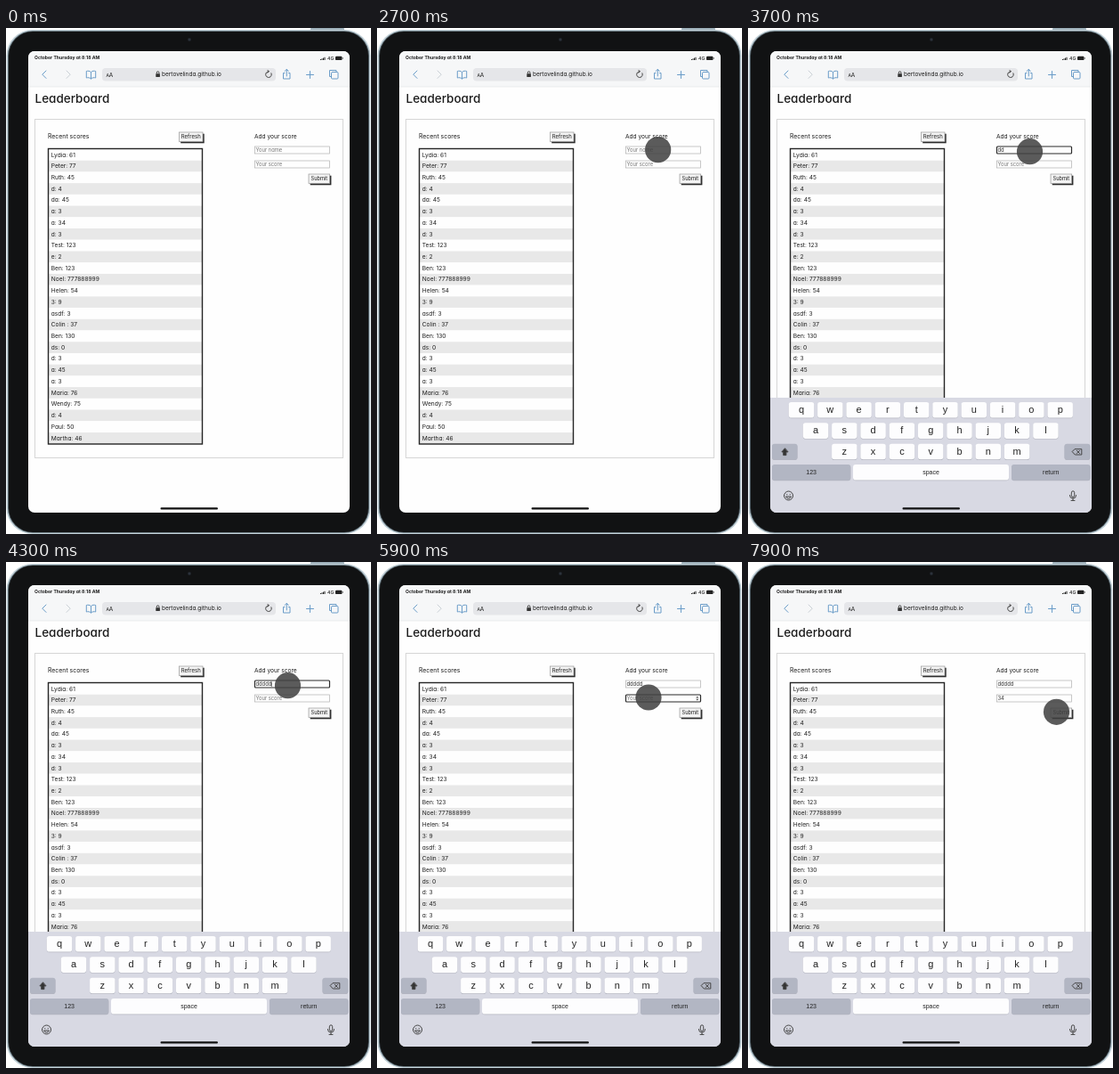
An HTML page that plays this animation: 410 by 568 pixels, repeating every 8000 ms.

```html
<!DOCTYPE html>
<html lang="en">
<head>
<meta charset="utf-8">
<title>Leaderboard on a tablet</title>
<style>
  html, body { margin: 0; width: 100%; height: 100%; overflow: hidden; background: #fff; }
  svg { display: block; }
  text { font-family: Inter, "Open Sans", sans-serif; font-feature-settings: "cv11"; fill: #1c1c1c; }
  .key { font-family: "Liberation Sans", Arial, sans-serif; text-anchor: middle; fill: #222; }
  .line { fill: none; stroke-width: 1; stroke-linecap: round; stroke-linejoin: round; }
  .blue { stroke: #6a9cc8; }
  .dark { stroke: #444; }
</style>
</head>
<body>
<svg id="stage" width="410" height="568" viewBox="0 0 410 568">
  <defs>
    <clipPath id="screen"><rect x="25" y="26" width="361" height="518" rx="7"/></clipPath>
  </defs>

  <!-- tablet body -->
  <rect x="342" y="0" width="38" height="5" rx="1" fill="#9fb1bb"/>
  <rect x="0.5" y="2" width="409" height="566" rx="29" fill="#c3d2d9"/>
  <rect x="2" y="3.2" width="406" height="563.6" rx="28" fill="#56646c"/>
  <rect x="3" y="4" width="404" height="562" rx="27" fill="#111213"/>
  <circle cx="206" cy="13" r="2" fill="#22262c"/>
  <circle cx="206" cy="13" r="0.8" fill="#3a4350"/>

  <g clip-path="url(#screen)">
    <rect x="25" y="26" width="361" height="518" fill="#fefefe"/>
    <rect x="25" y="26" width="361" height="40" fill="#f6f7f8"/>
    <path d="M25 66H386" stroke="#e4e5e7" stroke-width="0.7"/>

    <!-- status bar -->
    <text x="32" y="35.3" font-size="5.1" font-weight="700">October Thursday at 8:18 AM</text>
    <path d="M353.5 36v-1M355 36v-1.7M356.5 36v-2.4M358 36v-3.2" stroke="#222"/>
    <text x="361" y="36" font-size="5.2" font-weight="500">4G</text>
    <rect x="370" y="31.7" width="7.5" height="4.4" rx="1.2" fill="#222"/>
    <path d="M378.3 33.2v1.5" stroke="#222" stroke-width="0.7"/>

    <!-- browser bar -->
    <rect x="108" y="45" width="195" height="14.5" rx="4" fill="#e5e6e9"/>
    <g class="line blue">
      <path d="M45 48l-4.2 4.2l4.2 4.2"/>
      <path d="M68 48l4.2 4.2l-4.2 4.2" stroke="#c9cfd5"/>
      <path d="M95.5 49.5c-1.5-1.5-3.5-1.5-5.2-1v7.5c1.7-.5 3.7-.4 5.2 1c1.5-1.4 3.5-1.5 5.2-1v-7.5c-1.7-.5-3.7-.5-5.2 1v7.5"/>
      <path d="M313 50.5h-1.5v6.5h7.5v-6.5h-1.5M315.3 54v-7.5M313.2 48.5l2.1-2.2l2.1 2.2"/>
      <path d="M337.5 52.5h8M341.5 48.5v8"/>
      <path d="M365.5 54.5h-2v-7h7.5v2"/>
      <rect x="365.5" y="49.5" width="7.5" height="7.5" rx="1"/>
    </g>
    <text x="112.5" y="54.8" font-size="5">A</text>
    <text x="115.8" y="54.8" font-size="6.4">A</text>
    <rect x="168.3" y="51.3" width="4.6" height="3.7" rx="0.6" fill="#333"/>
    <path class="line dark" d="M169.3 51.3v-1.2a1.3 1.3 0 0 1 2.6 0v1.2"/>
    <text x="175" y="54.4" font-size="6.5">bertovelinda.github.io</text>
    <path class="line dark" d="M298 50.8a3.3 3.3 0 1 1-2.7-1.9l-1.3-1.5M295.3 48.9l-1.6 1.3"/>

    <!-- page -->
    <text x="32.5" y="83.8" font-size="13.5" font-weight="500">Leaderboard</text>
    <rect x="32.5" y="102.5" width="346" height="380" fill="none" stroke="#d6d6d6"/>
    <text x="47" y="123.8" font-size="6.9">Recent scores</text>
    <text x="279" y="123.8" font-size="6.6">Add your score</text>
    <g id="buttons"></g>
    <g id="rows"></g>
    <rect x="47.5" y="135.5" width="173" height="331.5" fill="none" stroke="#252525" stroke-width="1.4"/>

    <g id="nameField"></g>
    <g id="scoreField"></g>

    <g id="keyboard" visibility="hidden">
      <rect x="25" y="415" width="361" height="129" fill="#d8d9e3"/>
    </g>
    <rect x="173.5" y="538.3" width="64.5" height="2.2" rx="1.1" fill="#111"/>
    <circle id="touch" r="14.6" fill="#414141"/>
  </g>
</svg>
<script>
const LOOP = 8000;
const $ = id => document.getElementById(id);

function add(parent, tag, attrs, text) {
  const el = document.createElementNS("http://www.w3.org/2000/svg", tag);
  for (const key in attrs) el.setAttribute(key, attrs[key]);
  if (text !== undefined) el.textContent = text;
  parent.appendChild(el);
  return el;
}

// Score table
const scores = ["Lydia: 61", "Peter: 77", "Ruth: 45", "d: 4", "da: 45", "a: 3", "a: 34",
  "d: 3", "Test: 123", "e: 2", "Ben: 123", "Noel: 777888999", "Helen: 54", "3: 9", "asdf: 3",
  "Colin : 37", "Ben: 130", "ds: 0", "d: 3", "a: 45", "a: 3", "Maria: 76", "Wendy: 75",
  "d: 4", "Paul: 50", "Martha: 46"];
const rowHeight = 12.72;
scores.forEach((line, i) => {
  const y = 136 + i * rowHeight;
  add($("rows"), "rect", { x: 48, y, width: 172, height: rowHeight, fill: i % 2 ? "#e8e8e8" : "#fefefe" });
  add($("rows"), "text", { x: 50.8, y: y + 8.5, "font-size": 6.6 }, line);
});

// Page buttons
function button(x, y, w, size, label) {
  const g = $("buttons");
  add(g, "rect", { x: x + 1.7, y: y + 1.7, width: w, height: 10.6, fill: "#2c2c2c" });
  add(g, "rect", { x, y, width: w, height: 10.6, fill: "#f3f3f3", stroke: "#999", "stroke-width": 0.7 });
  add(g, "text", { x: x + w / 2, y: y + 7.2, "font-size": size, "text-anchor": "middle" }, label);
}
button(194.5, 117, 26.5, 6, "Refresh");
button(340, 164, 23.7, 5.7, "Submit");

// Form fields
function field(id, y, placeholder, spinner) {
  const g = $(id);
  const box = add(g, "rect", { x: 279.5, y, width: 84, height: 8, fill: "#fefefe" });
  const label = add(g, "text", { x: 280.5, y: y + 6, "font-size": 5.8 });
  const caret = add(g, "path", { d: `M298.3 ${y + 1.5}v5.4`, stroke: "#222", "stroke-width": 0.7 });
  const arrows = add(g, "path", { d: `M358.3 ${y + 3.5}l1.5-1.7l1.5 1.7zM358.3 ${y + 4.8}l1.5 1.7l1.5-1.7z`, fill: "#444" });
  return (value, focused, showCaret) => {
    box.setAttribute("stroke", focused ? "#2a2a2a" : "#b0b0b0");
    box.setAttribute("stroke-width", focused ? 1.2 : 0.7);
    box.setAttribute("rx", focused ? 1 : 0);
    label.textContent = value || placeholder;
    label.style.fill = value ? "#333" : "#757575";
    caret.setAttribute("visibility", showCaret ? "inherit" : "hidden");
    arrows.setAttribute("visibility", spinner && focused ? "inherit" : "hidden");
  };
}
const drawName = field("nameField", 133, "Your name", false);
const drawScore = field("scoreField", 149, "Your score", true);

// Keyboard
const keyboard = $("keyboard");
function key(x, y, w, label, size, fill) {
  add(keyboard, "rect", { x, y: y + 0.7, width: w, height: 17.6, rx: 2.8, fill: "#b3b5c0" });
  add(keyboard, "rect", { x, y, width: w, height: 17.6, rx: 2.8, fill });
  add(keyboard, "text", { x: x + w / 2, y: y + 8.6 + size * 0.32, "font-size": size, class: "key" }, label);
}
const white = "#fdfdfe", grey = "#b2b6c3";
[["qwertyuiop", 60, 420], ["asdfghjkl", 76, 443.3], ["zxcvbnm", 108.3, 466.7]].forEach(([letters, x, y]) =>
  [...letters].forEach((c, i) => key(x + i * 32.3 - 14.2, y, 28.4, c, 11, white)));
key(27, 466.7, 28.5, "", 8, grey);
key(355.5, 466.7, 28.8, "", 8, grey);
key(27, 490, 88.3, "123", 7, grey);
key(118, 490, 175, "space", 7, white);
key(296, 490, 88.5, "return", 7, grey);
const icon = d => add(keyboard, "path", { d, class: "line dark" });
icon("M41.3 472l-3.4 3.9h1.8v3.7h3.2v-3.7h1.8z").style.fill = "#333";
icon("M367.3 472.7h7.5v6.3h-7.5l-2.9-3.15zM369.3 474.3l3.2 3.2M372.5 474.3l-3.2 3.2");
icon("M40.5 525a5 5 0 1 0 10 0a5 5 0 1 0-10 0M42.7 526.3a3 3 0 0 0 5.6 0zM43.8 523.3v.5M47.2 523.3v.5");
icon("M363.3 521.5a1.7 1.7 0 0 1 3.4 0v3.3a1.7 1.7 0 0 1-3.4 0zM361.4 524.5a3.6 3.6 0 0 0 7.2 0M365 528.1v2.3M363 530.4h4");

// Motion tables: stepped values hold until the next entry
const at = (steps, t) => {
  let value = steps[0][1];
  for (const [start, next] of steps) if (t >= start) value = next;
  return value;
};
const fade = [[0, 0], [1000, 0.3], [1100, 0.6], [1200, 0.86]];
const focus = [[0, ""], [3000, "name"], [5400, "score"], [7700, ""]];
const typedName = [[0, 0], [3600, 1], [3700, 2], [3900, 3], [4000, 4], [4200, 5]];
const typedScore = [[0, 0], [6400, 1], [6600, 2]];

// Touch moves: start, end, from, to
const moves = [
  [2500, 2800, [313.3, 130.8], [316.5, 138.7]],
  [4800, 5200, [316.5, 138.7], [305, 152]],
  [7100, 7500, [305, 152], [346.5, 168.3]]
];
function touchAt(t) {
  let spot = moves[0][2];
  for (const [start, end, a, b] of moves) {
    if (t < start) break;
    const p = Math.min(1, (t - start) / (end - start));
    const e = p * p * (3 - 2 * p);
    spot = a.map((v, i) => v + (b[i] - v) * e);
  }
  return spot;
}

function draw(now) {
  const t = Math.floor(now % LOOP / 100) * 100;
  const active = at(focus, t);
  const count = at(typedName, t);
  const [x, y] = touchAt(t);
  $("touch").setAttribute("cx", x);
  $("touch").setAttribute("cy", y);
  $("touch").setAttribute("opacity", at(fade, t));
  keyboard.setAttribute("visibility", t >= 3000 ? "visible" : "hidden");
  drawName("d".repeat(count), active === "name", active === "name" && t >= 4300);
  drawScore("34".slice(0, at(typedScore, t)), active === "score", false);
}

const begin = performance.now();
function tick() {
  draw(performance.now() - begin);
  requestAnimationFrame(tick);
}
tick();
</script>
</body>
</html>
```
